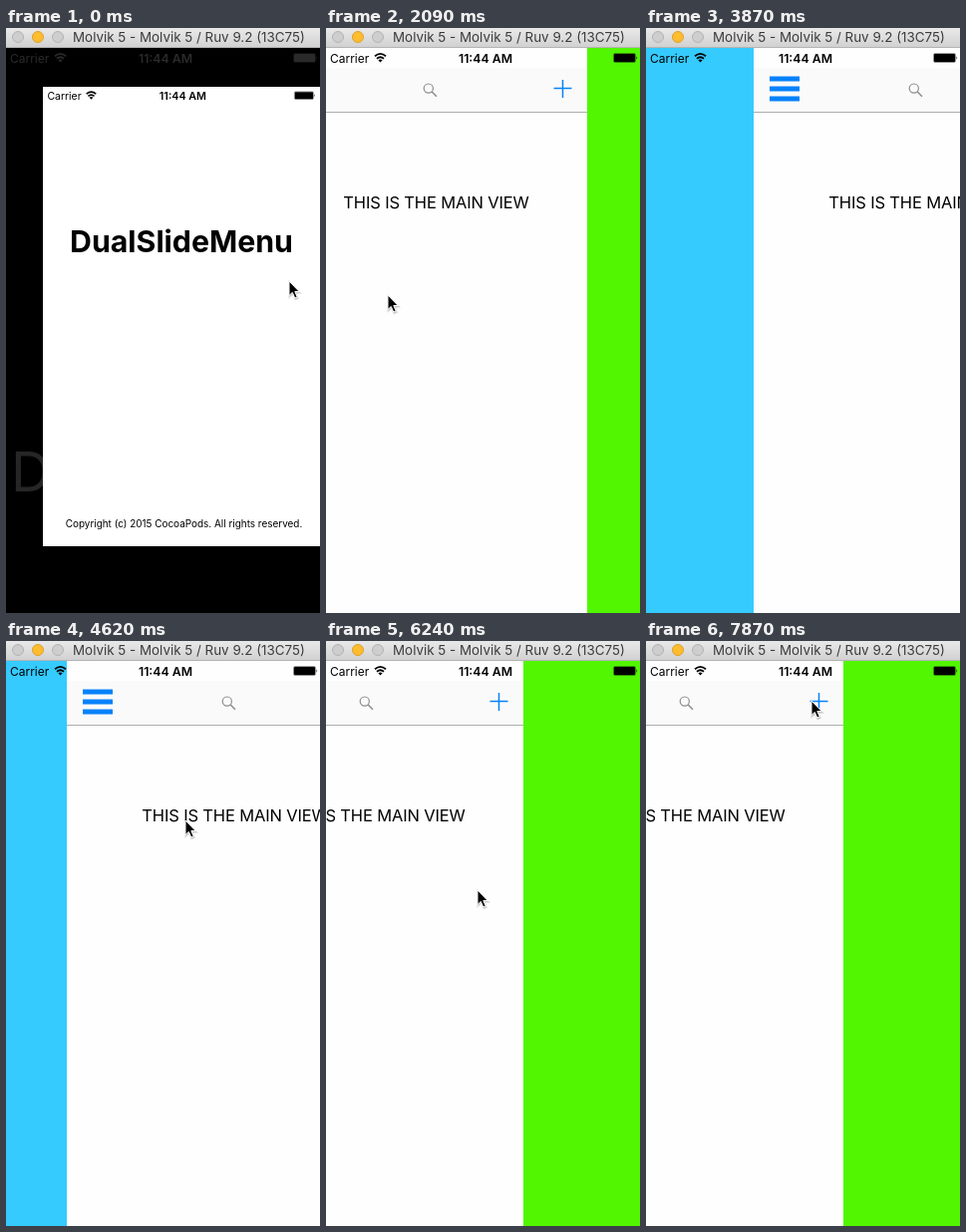
An HTML page that plays this animation: 315x587 px, repeating every 8 s.

```html
<!DOCTYPE html>
<html lang="en">
<head>
<meta charset="utf-8">
<title>Dual slide menu</title>
<style>
  html, body { margin: 0; width: 100%; height: 100%; overflow: hidden; background: #000; }
  svg { display: block; width: 315px; height: 587px; font-family: Inter, "Liberation Sans", sans-serif; }
  .bold { font-weight: 700; }
  .semi { font-weight: 600; }
  .mid { text-anchor: middle; }
  .line { fill: none; stroke: currentColor; }
</style>
</head>
<body>
<svg viewBox="0 0 315 587">
  <defs>
    <linearGradient id="chrome" x2="0" y2="1">
      <stop stop-color="#e9e9e9"/><stop offset="1" stop-color="#d0d0d0"/>
    </linearGradient>
    <g id="status" fill="currentColor">
      <text x="4" y="14.5" font-size="12">Carrier</text>
      <g class="line" stroke-width="1.8">
        <path d="M49 8.2Q54.5 3.6 60 8.2M51 10.8Q54.5 7.8 58 10.8"/>
      </g>
      <path d="M52.4 12.3Q54.5 10.6 56.6 12.3L54.5 14.6Z"/>
      <text class="mid semi" x="160" y="14.5" font-size="12.3">11:44 AM</text>
      <rect class="line" x="288.5" y="5.5" width="22" height="9" rx="1.5" stroke-width=".8" opacity=".5"/>
      <rect x="289" y="6" width="21" height="8" rx=".8"/>
      <path d="M311.5 8.3q1.5 1.7 0 3.4z"/>
    </g>
  </defs>

  <rect width="315" height="587"/>
  <g id="home" color="#2a2a2a">
    <text x="5" y="465" font-size="55" fill="#262626">D</text>
    <use href="#status" y="20"/>
  </g>

  <g id="app">
    <rect id="menu" y="20" width="315" height="567"/>
    <g id="main" color="#0782fb">
      <rect y="20" width="320" height="568" fill="#fefefe"/>
      <rect y="40" width="320" height="44" fill="#fafafa"/>
      <rect y="84" width="320" height="1" fill="#adadad"/>
      <path class="line" d="M16 51h30M16 61h30M16 71h30" stroke-width="5"/>
      <path class="line" d="M286.5 60.5h18M295.5 52v18" stroke-width="1.5"/>
      <g class="line" color="#8c8c8c" stroke-width="1.2">
        <circle cx="160.8" cy="60.6" r="4.6"/>
        <path d="M164.2 64l4.8 4.8" stroke-width="1.5"/>
      </g>
      <text class="mid" x="168.5" y="180.5" font-size="16.5" letter-spacing="-.15">THIS IS THE MAIN VIEW</text>
    </g>
  </g>

  <g id="launch">
    <rect id="sheet" fill="#fff"/>
    <text id="name" class="mid bold">DualSlideMenu</text>
    <text id="legal" class="mid">Copyright (c) 2015 CocoaPods. All rights reserved.</text>
    <use id="sheetStatus" href="#status"/>
  </g>
  <use id="bar" href="#status" y="20"/>

  <rect width="315" height="20" fill="url(#chrome)"/>
  <rect y="19" width="315" height="1" fill="#b4b4b4"/>
  <g fill="#cecece" stroke="#b3b3b3">
    <circle cx="12" cy="9" r="5.5"/>
    <circle cx="32" cy="9" r="5.5" fill="#fdbd2f" stroke="#dea02f"/>
    <circle cx="52" cy="9" r="5.5"/>
  </g>
  <text x="67" y="14" font-size="13.4" fill="#3c3c3c">Molvik 5 - Molvik 5 / Ruv 9.2 (13C75)</text>

  <g id="cursor">
    <path d="M0 0V14.5L3.3 11.4L5.8 17L8.2 16L5.8 10.5H10.2Z" transform="translate(.5 1.2)"
          fill="#0002" stroke="#0002" stroke-width="2"/>
    <path d="M0 0V14.5L3.3 11.4L5.8 17L8.2 16L5.8 10.5H10.2Z" stroke="#fff" stroke-width="1"/>
  </g>
</svg>
<script>
const LOOP = 8000, START = 1645, STEP = 148.1, SLIDE = 122, SPAN = 4;
const $ = id => document.getElementById(id);
const set = (el, attrs) => { for (const k in attrs) el.setAttribute(k, attrs[k]); };
const show = (el, on) => set(el, { visibility: on ? 'visible' : 'hidden' });

// launch sheet: time, x, y, width, height
const sheets = [[0, 37, 59, 283, 461], [150, 13, 33, 307, 529], [300, 0, 20, 320, 568]];
// launch opacity: time, value
const fades = [[0, 1], [600, .7], [750, .3], [900, 0]];
// slides: starting step, from, to
const slides = [
  [1.07, 0, -SLIDE], [6.44, -SLIDE, 0], [11.85, 0, SLIDE], [18, SLIDE, 0],
  [23.7, 0, -SLIDE], [32.5, -SLIDE, 0], [37.48, 0, -SLIDE]
];
// pointer: step, x, y
const pointer = [
  [-1, 284, 254], [2, 62, 268], [4, 62, 268], [6, 200, 262], [7, 330, 260],
  [17, 330, 200], [20, 180, 180], [23, 262, 67], [24, 265, 67], [26, 265, 67],
  [30, 152, 250], [31, 152, 250], [33, 262, 240], [35, 268, 70], [38, 268, 68],
  [39, 262, 68], [41, 168, 62], [42, 166, 60]
];

const last = (rows, t) => rows.reduce((a, r) => r[0] <= t ? r : a, rows[0]);

function slideAt(n) {
  if (n < slides[0][0]) return 0;
  const [start, from, to] = last(slides, n);
  const u = Math.min(1, (n - start) / SPAN);
  return Math.round(from + (to - from) * u * u * (3 - 2 * u));
}

function pointerAt(n) {
  const a = last(pointer, n);
  const b = pointer[pointer.indexOf(a) + 1] || a;
  const u = a === b ? 0 : (n - a[0]) / (b[0] - a[0]);
  return [1, 2].map(i => Math.round(a[i] + (b[i] - a[i]) * u));
}

function drawLaunch(t) {
  const [, x, y, width, height] = last(sheets, t);
  const opacity = last(fades, t)[1];
  const full = t >= 300;
  const k = width / 283, cx = x + width / 2;
  set($('launch'), { opacity });
  set($('sheet'), { x, y, width, height });
  set($('name'), { x: cx - 2.5 * (width < 320), y: y + height * .337 + 10.8 * k, 'font-size': 30.3 * k });
  set($('legal'), { x: cx, y: y + height - 18.8 * k, 'font-size': 9.95 * k });
  const s = width / 320;
  set($('sheetStatus'), { transform: `translate(${x + 1} ${y}) scale(${s * .985})` });
  show($('sheetStatus'), !full);
  show($('home'), !full);
  show($('app'), t >= 600);
  show($('bar'), full);
}

function draw(t) {
  drawLaunch(t);
  const n = Math.max(-1, Math.floor((t - START) / STEP));
  const x = slideAt(n);
  set($('main'), { transform: `translate(${x} 0)` });
  set($('menu'), { fill: x > 0 ? '#35cbff' : '#52f600' });
  set($('cursor'), { transform: `translate(${pointerAt(n).join(' ')})` });
}

const origin = performance.now();
function tick() {
  draw((performance.now() - origin) % LOOP);
  requestAnimationFrame(tick);
}
tick();
</script>
</body>
</html>
```
